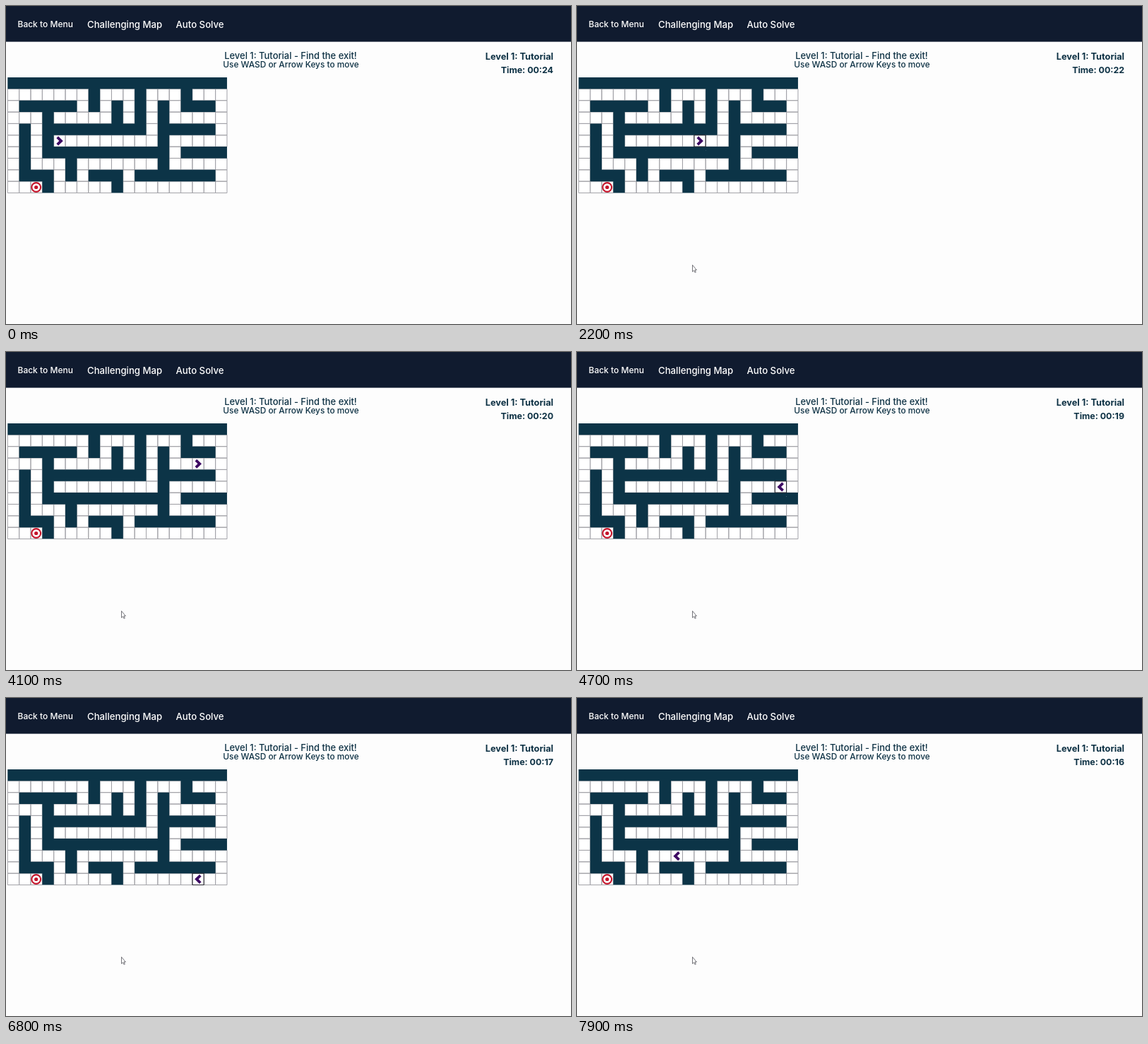
An HTML page for the animation above (8000 ms loop, 800x450 px).

```html
<!DOCTYPE html>
<html lang="en">
<head>
<meta charset="utf-8">
<title>Maze</title>
<style>
  html, body { margin: 0; width: 100%; height: 100%; overflow: hidden; background: #fdfdfd; }
  svg { display: block; width: 800px; height: 450px; font-family: Inter, "Open Sans", sans-serif; }
  .nav { fill: #fff; font-weight: 500; font-size: 13.2px; }
  .info { fill: #0d3144; font-weight: 500; text-anchor: middle; }
  .stat { fill: #0d3144; font-weight: 700; text-anchor: end; }
  #cells { fill: #fff; stroke: #a3a3a8; }
  #walls { fill: #0c3447; }
  #frame { fill: none; stroke: #26262e; }
  #chevron { fill: none; stroke: #3d0a63; stroke-width: 3.8; }
  #cursor { fill: #fff; stroke: #66666c; stroke-width: .9; }
</style>
</head>
<body>
<svg viewBox="0 0 800 450">
  <rect width="800" height="450" fill="#fdfdfd"/>
  <rect width="800" height="50.6" fill="#101b2f"/>
  <g class="nav">
    <text x="16.5" y="30" font-size="12" style="font-size:12px">Back to Menu</text>
    <text x="115" y="30.5">Challenging Map</text>
    <text x="240.5" y="30.5">Auto Solve</text>
  </g>
  <g class="info">
    <text x="403" y="75" font-size="12.95">Level 1: Tutorial - Find the exit!</text>
    <text x="403.5" y="86.5" font-size="11.85">Use WASD or Arrow Keys to move</text>
  </g>
  <g class="stat">
    <text x="775" y="75.5" font-size="12.75">Level 1: Tutorial</text>
    <text id="clock" x="775" y="94.5" font-size="12.4">Time: 00:24</text>
  </g>
  <path id="cells"/>
  <path id="walls"/>
  <g fill="none" stroke="#c4142a">
    <circle cx="42.7" cy="256.5" r="6.4" stroke-width="2.1"/>
    <circle cx="42.7" cy="256.5" r="2.6" fill="#c4142a" stroke="none"/>
  </g>
  <path id="frame"/>
  <path id="chevron" d="M-3.2 -5.2L2.2 0L-3.2 5.2"/>
  <path id="cursor" d="M.5 .5V10L2.6 8.1L4 11.2L5.3 10.6L4 7.6H6.4Z"/>
</svg>
<script>
const LOOP = 8000, STEP = 100;
const CELL = 16.35, LEFT = 2.3, TOP = 101;
const MAP = [
  '###################',
  '.......#...#...#...',
  '.#####.#.#.#.#.###.',
  '...#.....#.#.#.....',
  '.#.#########.#####.',
  '.#.#.........#.....',
  '.#.###########.####',
  '.#...#.......#.....',
  '.###.#.###.#######.',
  '...#.....#.........'
];
const DIRS = { R: [1, 0, 0], D: [0, 1, 90], L: [-1, 0, 180], U: [0, -1, 270] };
// heading, moves, time of the first move, time between moves
const RUNS = [
  ['R', 8, 1460, 140], ['U', 4, 2620, 180], ['R', 2, 3290, 150], ['D', 2, 3580, 130],
  ['R', 4, 3910, 125], ['D', 2, 4450, 110], ['L', 4, 4670, 110], ['D', 2, 5130, 120],
  ['R', 4, 5350, 120], ['D', 2, 6060, 170], ['L', 2, 6560, 190], ['L', 6, 6830, 70],
  ['U', 2, 7370, 190], ['L', 2, 7720, 110]
];
const $ = id => document.getElementById(id);
const square = (c, r) => `M${LEFT + CELL * c} ${TOP + CELL * r}h${CELL}v${CELL}h${-CELL}z`;

function squares(kind) {
  return MAP.map((line, r) =>
    [...line].map((ch, c) => ch === kind ? square(c, r) : '').join('')).join('');
}

function playerAt(t) {
  let c = 4, r = 5, turn = 0, last = -LOOP;
  for (const [dir, count, start, gap] of RUNS) {
    if (t < start) break;
    const n = Math.min(count, Math.floor((t - start) / gap) + 1);
    const [dx, dy, angle] = DIRS[dir];
    c += dx * n;
    r += dy * n;
    turn = angle;
    last = start + (n - 1) * gap;
  }
  return { c, r, turn, fresh: t - last < 60 };
}

function draw(t) {
  const { c, r, turn, fresh } = playerAt(t);
  const x = LEFT + CELL * (c + .5), y = TOP + CELL * (r + .5);
  $('chevron').setAttribute('transform', `translate(${x} ${y}) rotate(${turn})`);
  $('frame').setAttribute('d', fresh ? square(c, r) : '');

  const left = 24 - Math.floor((t + 400) / 1000);
  $('clock').textContent = `Time: 00:${left}`;

  const k = Math.min(1, Math.max(0, (t - 100) / 600));
  const ease = k * k * (3 - 2 * k);
  $('cursor').style.display = t < 100 ? 'none' : '';
  $('cursor').setAttribute('transform', `translate(${19 + 144 * ease} ${23 + 343 * ease})`);
}

$('cells').setAttribute('d', squares('.'));
$('walls').setAttribute('d', squares('#'));

const began = performance.now();
function tick(now) {
  const t = Math.max(0, now - began) % LOOP;
  draw(Math.floor(t / STEP) * STEP);
  requestAnimationFrame(tick);
}
draw(0);
requestAnimationFrame(tick);
</script>
</body>
</html>
```
